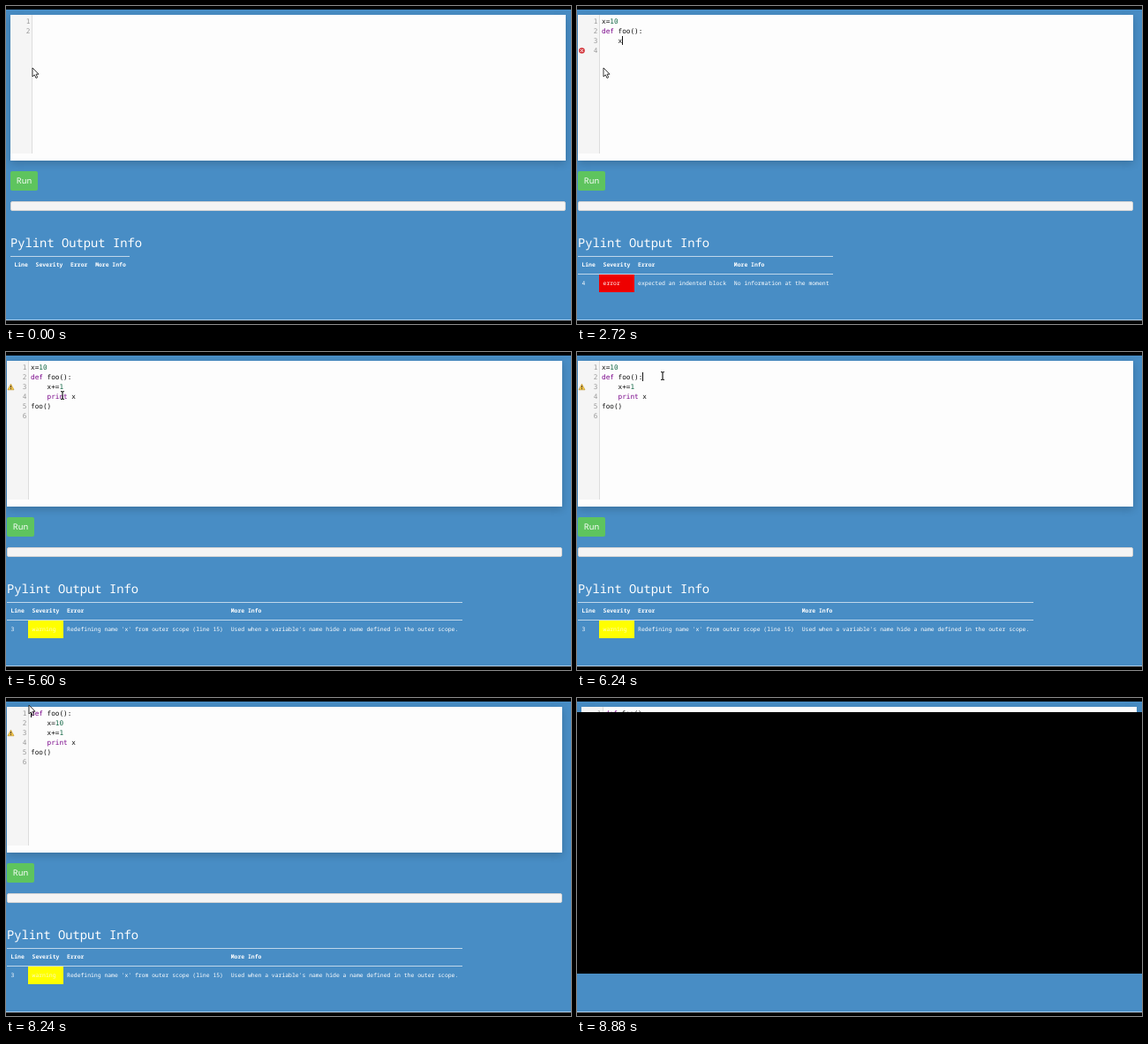
Recreate the animation shown at these times as an HTML page. Size 640 px wide and 360 px high, loop 8.96 s.

```html
<!DOCTYPE html>
<html lang="en">
<head>
<meta charset="utf-8">
<title>Python linter demo</title>
<style>
html, body { margin: 0; width: 100%; height: 100%; overflow: hidden; background: #000; }
#stage { position: relative; width: 640px; height: 360px; overflow: hidden; background: #488dc5; text-rendering: geometricPrecision; }
#stage div, #stage svg, table { position: absolute; }
#page { top: 0; left: 5px; width: 629px; height: 360px; }
#editor { top: 10px; width: 629px; height: 165px; background: #fdfdfd; box-shadow: 0 3px 9px rgba(0,0,0,.2); }
#gutter { width: 24px; height: 156.5px; background: #f5f5f5; border-right: 1px solid #ddd; }
#numbers, #code { top: 1.5px; margin: 0; font: 7.7px/11px "DejaVu Sans Mono", monospace; white-space: pre; }
#numbers { right: 606.5px; color: #999; text-align: right; }
#code { left: 27px; color: #111; }
#code b { font-weight: 400; color: #708; }
#code i { font-style: normal; color: #164; }
#selection { left: 27px; top: 1.5px; width: 602px; height: 11px; background: #d7d4f0; }
#caret { width: 1px; height: 10px; background: #111; }
#run { top: 186.5px; width: 31px; height: 22.5px; border-radius: 2px; background: #5ec45e; color: #fff; font: 9.3px/22px "Noto Sans", sans-serif; text-align: center; }
#run.hover { background: #4aab4a; }
#output { top: 220.5px; width: 627px; height: 9px; border: 1px solid #d4d4d4; border-radius: 2px; background: #f4f4f4; color: #222; font: 6.8px/19px "DejaVu Sans Mono", monospace; text-indent: 5px; }
#report { top: 259px; color: #fff; font-family: "Noto Sans Mono", monospace; white-space: nowrap; }
#title { font-size: 13.8px; line-height: 20px; }
table { top: 23.5px; border-spacing: 0; font-size: 6.42px; line-height: 10.5px; text-align: left; }
th, td { padding: 4.5px 4.4px; border-top: 1px solid rgba(255,255,255,.65); background-clip: padding-box; }
td.error { background-color: #ee0000; }
td.warning { background-color: #ffff00; color: #fffbc0; }
.bar { left: 0; width: 640px; background: #000; }
#cut { top: 16px; height: 296px; }
#edge { top: 355px; width: 640px; height: 1px; background: #b5cfe5; }
svg { overflow: visible; }
</style>
</head>
<body>
<div id="stage">
  <div id="page">
    <div id="editor">
      <div id="gutter"></div>
      <div id="selection"></div>
      <div id="numbers"></div>
      <div id="code"></div>
      <div id="caret"></div>
      <svg id="error" width="7" height="7" style="left:1px"><circle cx="3.5" cy="3.5" r="3.3" fill="#d3353b"/><path d="M2 2l3 3M5 2L2 5" stroke="#fff"/></svg>
      <svg id="warning" width="7" height="7" style="left:1px"><path d="M3.5 .2L7 6.8H0Z" fill="#f5c842" stroke="#b58a24" stroke-width=".6" stroke-linejoin="round"/><path d="M3.5 2.2v2.2M3.5 5.1v1" stroke="#433"/></svg>
    </div>
    <div id="run">Run</div>
    <div id="output"></div>
    <div id="report">
      <div id="title">Pylint Output Info</div>
      <table>
        <thead><tr><th>Line<th>Severity<th>Error<th>More Info</tr></thead>
        <tbody id="rows"></tbody>
      </table>
    </div>
  </div>
  <svg id="mouse" width="1" height="1">
    <path id="arrow" d="M0 0V10L2.3 7.9 4 11.6 5.7 10.8 4.1 7.2H7Z" fill="#fff" stroke="#222" stroke-width=".9"/>
    <path id="ibeam" d="M-2-4.5Q0-4.5 0-3.5Q0-4.5 2-4.5M0-4V4M-2 4.5Q0 4.5 0 3.5Q0 4.5 2 4.5" fill="none" stroke="#222" stroke-width="1.2"/>
    <path id="hand" d="M-1 0Q0-1 .9 0V3.6L4 4.4Q5 5 4.6 7L3.6 10H-1.3L-3.8 6.4Q-3.8 5-2.4 5.6L-1 6.8Z" fill="#fff" stroke="#222" stroke-width=".9"/>
  </svg>
  <div id="edge"></div>
  <div class="bar" style="top:0;height:4px"></div>
  <div class="bar" style="top:356px;height:4px"></div>
  <div class="bar" id="cut"></div>
</div>
<script>
const LOOP = 8960, STEP = 80, CHAR = 4.635, LINE = 11;
const el = id => document.getElementById(id);
const show = (id, on) => { el(id).style.display = on ? 'block' : 'none'; };
const place = (id, x, y) => { el(id).style.left = x + 'px'; el(id).style.top = y + 'px'; };

// Edits are [time, action]; typing spreads one string over equal steps.
const type = (start, text) => [...text].map((c, i) => [start + i * STEP, s => insert(s, c)]);
function insert(s, text) {
  s.text = s.text.slice(0, s.at) + text + s.text.slice(s.at);
  s.at += text.length;
}
function erase(s, count) {
  s.text = s.text.slice(0, s.at - count) + s.text.slice(s.at);
  s.at -= count;
}
const edits = [
  ...type(400, 'x'), ...type(640, '='), ...type(800, '10'), [1040, s => insert(s, '\n')],
  ...type(1440, 'def foo():'), [2240, s => insert(s, '\n    ')],
  ...type(2720, 'x+='), ...type(3040, '1'), [3200, s => insert(s, '\n    ')],
  ...type(3360, 'print x'), [4080, s => insert(s, '\n    ')],
  [4400, s => erase(s, 2)], [4480, s => erase(s, 2)],
  ...type(4640, 'f'), ...type(4800, 'oo()'),
  [6000, s => { s.at = s.text.indexOf(':') + 1; }],
  [6400, s => insert(s, '\n    ')], ...type(6560, 'x=10'),
  [7520, s => { s.at = 5; }],
  [7760, s => { s.at = 0; s.selected = true; }],
  [8160, s => { s.text = s.text.slice(5); s.selected = false; }]
];

const reports = [
  [0, null],
  [2400, [4, 'error', 'expected an indented block', 'No information at the moment']],
  [3600, [3, 'warning', "Redefining name 'x' from outer scope (line 15)",
    "Used when a variable's name hide a name defined in the outer scope."]],
  [8400, null]
];

const path = [
  [0, 29.5, 69.5, 'arrow'], [3520, 29.5, 69.5, 'arrow'], [3600, 31, 71, 'ibeam'],
  [5280, 31, 71, 'ibeam'], [5920, 97, 27, 'ibeam'], [6960, 97, 27, 'ibeam'],
  [7440, 25.5, 27.5, 'arrow'], [7600, 25.5, 27.5, 'arrow'], [7840, 26, 8, 'arrow'],
  [8240, 26, 8, 'arrow'], [8560, 7, 196, 'hand'], [LOOP, 7, 196, 'hand']
];

function documentAt(t) {
  const s = { text: '\n', at: 0, last: -600, selected: false };
  for (const [time, action] of edits) {
    if (time > t) break;
    action(s);
    s.last = time;
  }
  return s;
}

function mouseAt(t) {
  const i = path.findIndex(p => p[0] > t);
  const [t0, x0, y0, shape] = path[i - 1], [t1, x1, y1] = path[i];
  const k = (t - t0) / (t1 - t0), e = k * k * (3 - 2 * k);
  return { x: x0 + (x1 - x0) * e, y: y0 + (y1 - y0) * e, shape };
}

const highlight = text => text.replace(/\b(def|print)\b|\d+/g, (m, word) => word ? `<b>${m}</b>` : `<i>${m}</i>`);

function drawEditor(t) {
  const s = documentAt(t), before = s.text.slice(0, s.at).split('\n');
  el('code').innerHTML = highlight(s.text);
  el('numbers').textContent = s.text.split('\n').map((_, i) => i + 1).join('\n');
  place('caret', 27 + before.at(-1).length * CHAR, 2 + (before.length - 1) * LINE);
  show('caret', t < 8560 && !s.selected && (t - s.last) % 1060 < 530);
  show('selection', s.selected);
}

function drawReport(t) {
  const row = reports.filter(r => r[0] <= t).at(-1)[1];
  el('page').style.left = (row ? 1 : 5) + 'px';
  el('rows').innerHTML = row ? '<tr>' + row.map((c, i) => `<td class="${i === 1 ? c : ''}">${c}</td>`).join('') + '</tr>' : '';
  for (const kind of ['error', 'warning']) {
    const on = row && row[1] === kind;
    show(kind, on);
    if (on) el(kind).style.top = 4 + (row[0] - 1) * LINE + 'px';
  }
}

function draw(now) {
  const t = Math.floor(now % LOOP / STEP) * STEP;
  drawEditor(t);
  drawReport(t);
  const mouse = mouseAt(t), done = t >= 8640;
  place('mouse', mouse.x, mouse.y);
  for (const shape of ['arrow', 'ibeam', 'hand']) show(shape, shape === mouse.shape);
  el('run').className = mouse.shape === 'hand' ? 'hover' : '';
  el('output').textContent = done ? '11' : '';
  el('output').style.height = (done ? 19 : 9) + 'px';
  el('report').style.top = (done ? 269 : 259) + 'px';
  show('cut', t >= 8880);
}

const start = performance.now();
function tick() {
  draw(performance.now() - start);
  requestAnimationFrame(tick);
}
tick();
</script>
</body>
</html>
```
